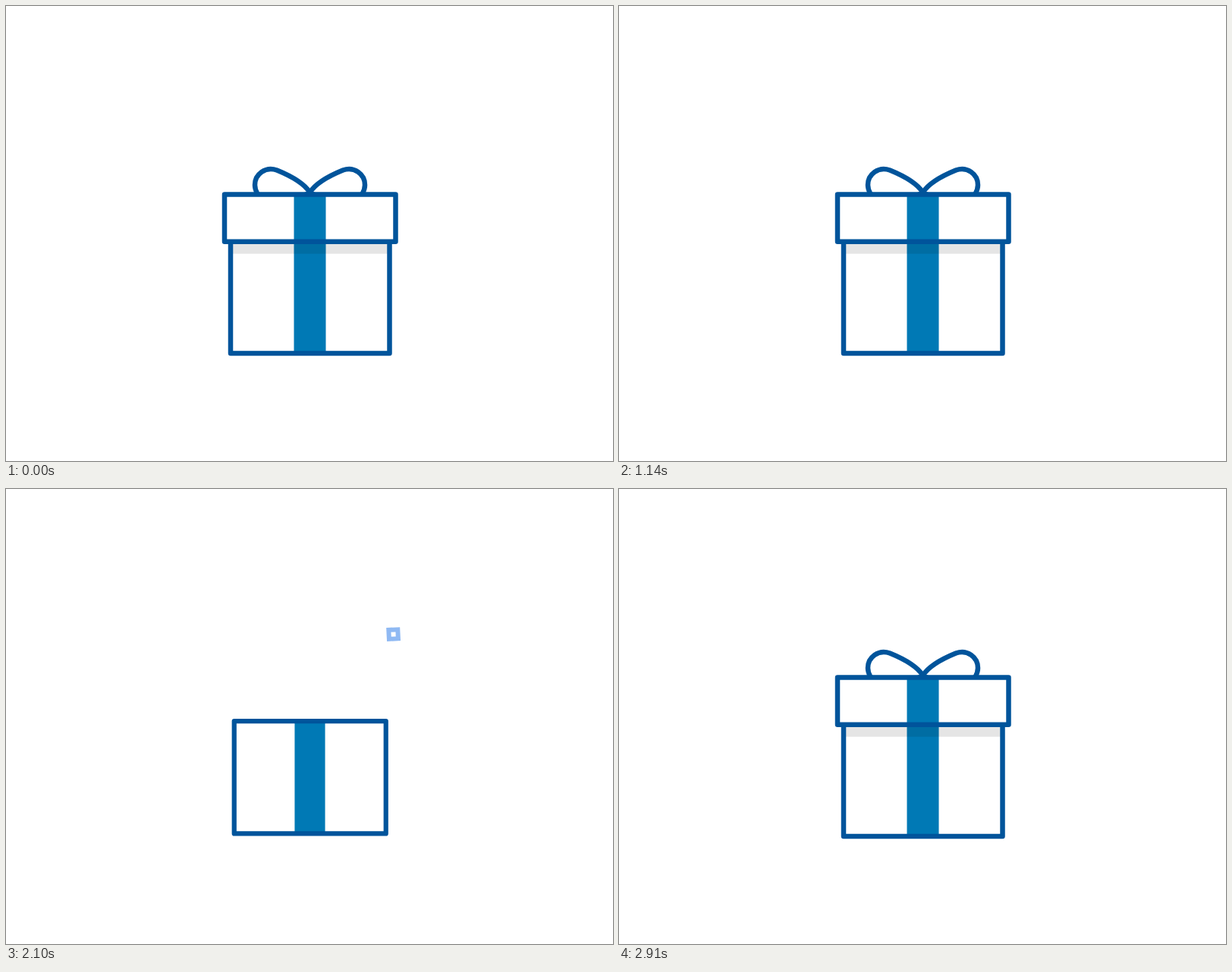
Animation, 800 px wide and 600 px high, one loop 3.54 s. Source, as an HTML page:

```html
<!DOCTYPE html>
<html>
<head>
<meta charset="utf-8">
<style>
html, body { margin: 0; height: 100%; overflow: hidden; background: #fff; }
svg { display: block; width: 100vw; height: 100vh; }
.line { stroke: #00549b; stroke-width: 6.5; stroke-linejoin: round; stroke-linecap: round; fill: none; }
.tape { fill: #0079b5; }
.bit { stroke: #0f68e6; fill: none; }
</style>
</head>
<body>
<svg viewBox="0 0 800 600">
  <filter id="soft" x="-20%" y="-30%" width="140%" height="160%">
    <feGaussianBlur stdDeviation="4.2 3.2"/>
  </filter>
  <clipPath id="inside"><rect x="296" y="302.5" width="209.5" height="155.5"/></clipPath>
  <g id="bits" class="bit">
    <circle r="16.6" stroke-width="5.6"/>
    <circle r="16.6" stroke-width="5.6"/>
    <rect x="-6" y="-6" width="12" height="12" stroke-width="6"/>
  </g>
  <g id="bow" class="line">
    <path id="loop" d="M400.5 246C392 232 368 221 357 216.5C342 211 328 222 328 236C328 240 329 243 331 247C336 255 375 261 400.5 246"/>
    <use href="#loop" transform="matrix(-1 0 0 1 801 0)"/>
  </g>
  <g id="box">
    <rect x="296" y="302.5" width="209.5" height="155.5" fill="#fff"/>
    <rect class="tape" x="379.5" y="302.5" width="42" height="155.5"/>
    <g clip-path="url(#inside)"><rect id="shade" x="270" y="290" width="261" height="36.7" opacity=".1"/></g>
    <rect id="boxLine" class="line" x="296" y="302.5" width="209.5" height="155.5"/>
  </g>
  <g id="lid">
    <rect x="288" y="248.5" width="225.5" height="62.3" fill="#fff"/>
    <rect class="tape" x="379.5" y="248.5" width="42" height="62.3"/>
    <rect id="lidLine" class="line" x="288" y="248.5" width="225.5" height="62.3"/>
  </g>
  <g id="rays" class="bit" stroke-width="8" stroke-linecap="round"></g>
</svg>
<script>
const LOOP = 3540, STEP = 30, CX = 400.5;
const el = id => document.getElementById(id);
const set = (node, attrs) => { for (const k in attrs) node.setAttribute(k, attrs[k]); };
const span = (t, a, b) => Math.min(1, Math.max(0, (t - a) / (b - a)));
const smooth = p => (1 - Math.cos(Math.PI * p)) / 2;
const about = (y, sx, sy = sx) => `translate(${CX} ${y}) scale(${sx} ${sy}) translate(${-CX} ${-y})`;

// grow from nothing, overshoot, settle
function pop(t, start) {
  const up = span(t, start, start + 180), back = smooth(span(t, start + 180, start + 330));
  return 1.22 * (1 - (1 - up) ** 2) - 0.22 * back;
}

const angles = [-48.7, -23, 0, 23, 48.7];
const rays = angles.map(a => {
  const ray = document.createElementNS("http://www.w3.org/2000/svg", "line");
  set(ray, { transform: `translate(${CX} 354) rotate(${a})` });
  return el("rays").appendChild(ray);
});

const bits = [
  { start: 1480, dx: -163, vy: 426, g: 213 },
  { start: 1540, dx: 176, vy: 340, g: 170 },
  { start: 1650, dx: 115, vy: 945, g: 836 }
];

function wobble(t) {
  const keys = [0, -5.3, 5.3, -5.3, 5.3, 0];
  const k = (t + 5) / 150, i = Math.floor(k);
  return t > 0 && i < 5 ? keys[i] + (keys[i + 1] - keys[i]) * smooth(k - i) : 0;
}

function draw(t) {
  const gone = t >= 2250;

  const boxScale = gone ? pop(t, 2280) : 1 - span(t, 2030, 2250) ** 2.7;
  set(el("box"), { transform: about(380.2, boxScale) });
  set(el("boxLine"), { filter: gone && t < 2610 ? "url(#soft)" : "none" });

  let lidMove, bowMove, fade = 1;
  if (gone) {
    lidMove = about(280, pop(t, 2420));
    const rise = span(t, 2560, 2690), k = (1 - span(t, 2690, 2880)) ** 3;
    const grow = 1 - (1 - rise) ** 2;
    bowMove = about(247, grow * (1 + 0.15 * k), grow * (1 + 0.62 * k));
    set(el("shade"), { opacity: 0.1 * span(t, 2400, 2600) });
  } else {
    const p = span(t, 1440, 1680) ** 3;
    const squash = 1 - 0.08 * smooth(span(t, 1140, 1440));
    const turn = wobble(t) + 54 * p;
    fade = Math.max(0, 1 - 1.22 * p);
    lidMove = bowMove = `translate(${36 * p} ${-155 * p}) rotate(${turn} ${CX} 311) ` + about(311, 1, squash);
    set(el("shade"), { opacity: 0.1 * (1 - span(t, 1500, 1590)) });
  }
  set(el("lid"), { transform: lidMove, opacity: fade });
  set(el("bow"), { transform: bowMove, opacity: fade });
  set(el("shade"), { transform: lidMove });
  set(el("lidLine"), { filter: gone && t < 2750 ? "url(#soft)" : "none" });

  const u = span(t, 1440, 1680), left = (1 - u) ** 2;
  const tip = 187.5 - 50 * left;
  set(el("rays"), { visibility: u > 0 && u < 1 ? "visible" : "hidden" });
  rays.forEach(r => set(r, { y1: -tip, y2: -tip + 20 * left * Math.min(1, u * 4) }));

  bits.forEach((b, i) => {
    const p = span(t, b.start, b.start + 470);
    set(el("bits").children[i], {
      transform: `translate(${CX + b.dx * p} ${330 - b.vy * p + b.g * p * p}) rotate(${300 * (p - 0.957) - 3})`,
      opacity: p > 0 ? Math.min(1, (1 - p) * 11) : 0
    });
  });
}

const t0 = performance.now();
function tick() {
  const t = (performance.now() - t0) % LOOP;
  draw(t - t % STEP);
  requestAnimationFrame(tick);
}
draw(0);
requestAnimationFrame(tick);
</script>
</body>
</html>
```
